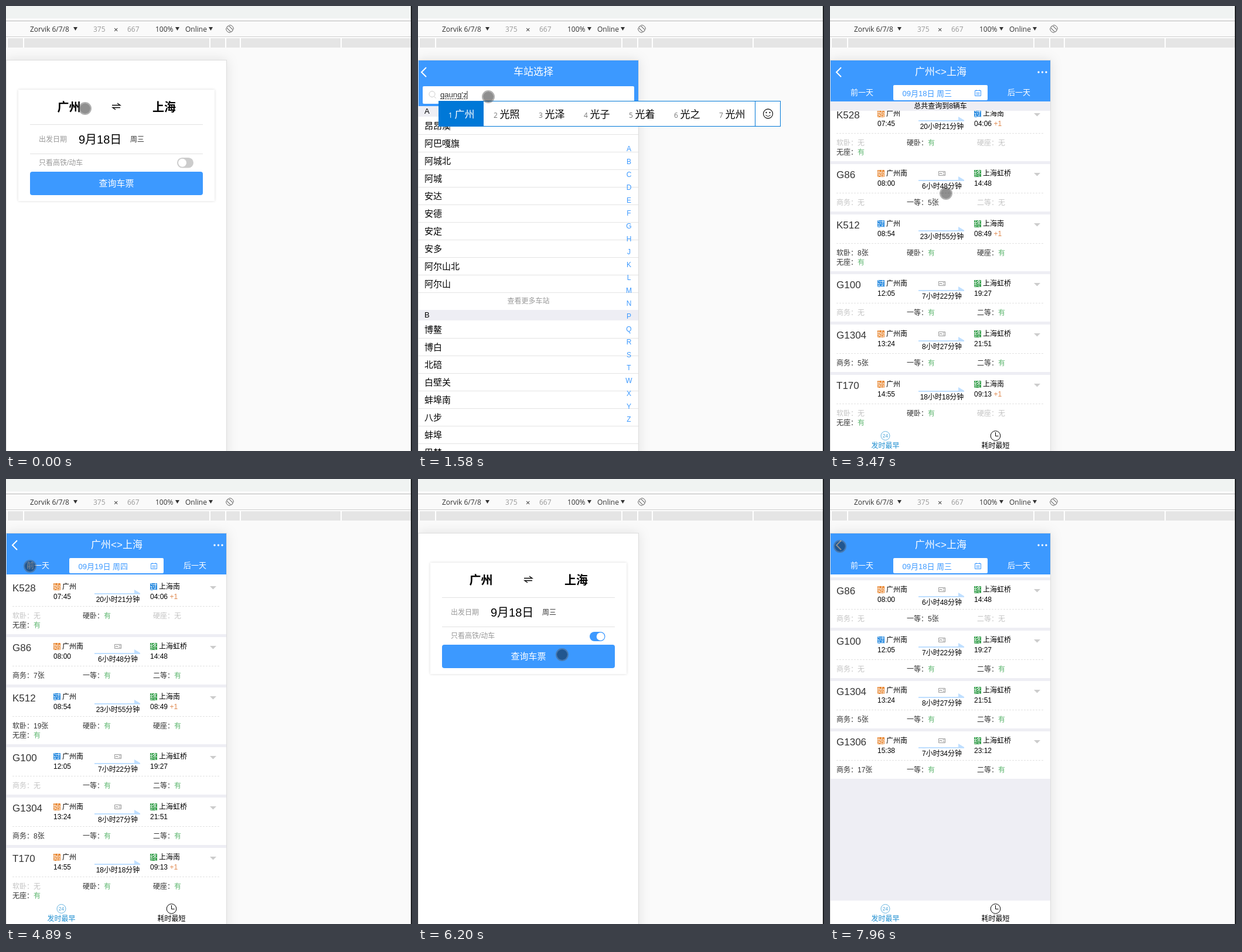
Animation, 693 px wide and 760 px high, one loop 8000 ms. Source, as an HTML page:

```html
<!DOCTYPE html>
<html lang="zh-CN">
<head>
<meta charset="utf-8">
<style>
html, body { margin: 0; width: 100%; height: 100%; overflow: hidden; background: #fafafa; }
svg { display: block; font-family: "Liberation Sans", "Noto Sans CJK SC", "Noto Sans CJK", sans-serif; }
.tool { font-family: "Open Sans", sans-serif; }
.phone { filter: drop-shadow(0 0 10px #0000001a); }
.card { filter: drop-shadow(0 0 2px #00000026); }
</style>
</head>
<body>
<svg id="stage" width="693" height="760"></svg>
<script>
const BLUE = '#3c99ff', PALE = '#eeeef4', LOOP = 8000, GLIDE = 340;

// drawing helpers
const rect = (x, y, w, h, fill, more = '') =>
  `<rect x="${x}" y="${y}" width="${w}" height="${h}" fill="${fill}" ${more}/>`;
const text = (s, x, y, size, fill = '#000', more = '') =>
  `<text x="${x}" y="${y}" font-size="${size}" fill="${fill}" ${more}>${s}</text>`;
const mid = (s, x, y, size, fill, more = '') => text(s, x, y, size, fill, 'text-anchor="middle" ' + more);
const path = (d, stroke, width = 1, more = '') =>
  `<path d="${d}" fill="none" stroke="${stroke}" stroke-width="${width}" ${more}/>`;
const solid = (d, fill) => `<path d="${d}" fill="${fill}"/>`;
const circle = (x, y, r, fill, more = '') => `<circle cx="${x}" cy="${y}" r="${r}" fill="${fill}" ${more}/>`;
const ring = (x, y, r, stroke, width = 1) => circle(x, y, r, 'none', `stroke="${stroke}" stroke-width="${width}"`);
const each = (list, fn) => [...list].map(fn).join('');
const clamp = p => Math.min(1, Math.max(0, p));
const ease = p => p * p * (3 - 2 * p);

const pen = document.createElement('canvas').getContext('2d');
function textWidth(s, size) {
  pen.font = `${size}px "Liberation Sans", "Noto Sans CJK SC", sans-serif`;
  return pen.measureText(s).width;
}

// where the pointer rests: arrival time, x, y
const stops = [
  [630, 120, 155], [2300, 278, 180], [2650, 204, 312], [3290, 198, 320], [4000, 319, 151], [4890, 41, 149],
  [5400, 17, 115], [5820, 306, 268], [6200, 246, 300], [7210, 300, 288], [7640, 26, 131], [7960, 17, 115]
];

function pointer(t) {
  let x = 135, y = 175;
  for (const [arrive, toX, toY] of stops) {
    const p = ease(clamp((t - arrive) / GLIDE + 1));
    x += (toX - x) * p;
    y += (toY - y) * p;
  }
  return circle(x, y, 9, '#000', 'fill-opacity=".44"') + ring(x, y, 10, '#55555577', 2);
}

const chrome =
  rect(0, 0, 693, 760, '#fafafa') + rect(0, 0, 693, 21, '#f0f3f2') + rect(0, 25, 693, 1, '#b9b9b9') +
  rect(0, 52, 693, 1, '#ccc') + rect(0, 53, 693, 2, '#fff') + rect(0, 55, 693, 16, '#e5e5e5') +
  each([1, 29, 347, 374, 399, 571], x => rect(x, 54, 2, 17, '#fff')) +
  '<g class="tool">' + text('Zorvik 6/7/8', 41, 44, 12, '#333') + text('375', 149, 44, 12, '#999') +
  text('×', 184, 45, 13, '#333') + text('667', 207, 44, 12, '#999') + text('100%', 255, 44, 12, '#333') +
  text('Online', 306, 44, 12, '#333') + '</g>' +
  each([115, 289, 346], x => solid(`M${x} 36h7l-3.5 6z`, '#333')) +
  '<g transform="translate(382 39)" fill="none" stroke="#666">' +
  '<rect x="-2.5" y="-5.5" width="5" height="11" rx="1" transform="rotate(-45)"/>' +
  '<path d="M-1 -6.3A6.5 6.5 0 0 1 6.3 1M1 6.3A6.5 6.5 0 0 1 -6.3 -1"/></g>' +
  rect(0, 92, 377, 680, '#ddd', 'class="phone"') + rect(1, 93, 375, 667, '#fff');

const back = x => path(`M${x + 8} 105l-8 8 8 8`, '#fff', 2);

// search form
function home(t) {
  const toggle = t > 6000
    ? rect(293, 261, 26.5, 16, BLUE, 'rx="8"') + circle(311.5, 269, 6.8, '#fff')
    : rect(292, 259, 28, 17.5, '#ccc', 'rx="8.7"') + circle(301, 267.8, 7, '#fff');
  return rect(21, 143, 335, 190, '#fff', 'class="card"') +
    text('广州', 87.5, 180, 20, '#000', 'font-weight="bold"') +
    text('上海', 250, 180, 20, '#000', 'font-weight="bold"') +
    path('M181 169.5H195L190 166M195 173.5H182L187 177', '#000', 1.3) +
    rect(41, 202, 295, 1, '#e2e2e2') + rect(41, 252, 295, 1, '#e2e2e2') +
    text('出发日期', 56, 232, 12, '#999') + text('9月18日', 124, 235, 20) + text('周三', 212, 232, 12, '#333') +
    text('只看高铁/动车', 56, 272, 12, '#999') + toggle +
    rect(41, 283, 295, 40, BLUE, 'rx="4"') + mid('查询车票', 188.5, 308, 15, '#fff');
}

// station picker
const groups = {
  A: '昂昂溪 阿巴嘎旗 阿城北 阿城 安达 安德 安定 安多 阿尔山北 阿尔山',
  B: '博鳌 博白 北碚 白壁关 蚌埠南 八步 蚌埠 巴楚'
};

const rows = (names, top) => each(names.split(' '), (name, i) =>
  text(name, 11, top + 20.5 + i * 30, 15) + rect(1, top + 30 + i * 30, 375, 1, '#e4e4e4'));
const group = (name, top) =>
  rect(1, top, 375, 18, PALE) + text(name, 11, top + 13, 13) + rows(groups[name], top + 18);

function candidates(words) {
  let x = 35, items = '';
  words.split(' ').forEach((word, i) => {
    const wide = 43 + 17 * word.length;
    if (!i) items += rect(x, 162, wide, 44, '#0078d7');
    items += text(i + 1, x + 17, 191, 12, i ? '#777' : '#fff', 'class="tool"') +
      text(word, x + 27.5, 191, 17, i ? '#000' : '#fff');
    x += wide;
  });
  const face = x + 23.5;
  return rect(35.5, 162.5, x + 9, 43, '#fff', 'stroke="#0078d7"') + items + path(`M${x + 1.5} 163v43`, '#0078d7') +
    ring(face, 184, 8, '#222', 1.3) + each([-3, 3], dx => circle(face + dx, 182, 1.2, '#222')) +
    path(`M${face - 4} 186q4 5 8 0`, '#222', 1.2);
}

function stations(t) {
  const chosen = t >= 1710, keys = "gaung'z".slice(0, Math.max(0, Math.ceil((t - 1200) / 50)));
  const typed = chosen ? '广州' : keys, composing = keys && !chosen;
  const width = textWidth(typed, 13.1);
  const list = chosen
    ? rows('广州 广州东 广州南 广州北 广州西', 171)
    : group('A', 171) + mid('查看更多车站', 188.5, 508, 12, '#999') + group('B', 519) +
      each('ABCDEFGHJKLMNPQRSTWXYZ', (c, i) => mid(c, 360, 248 + i * 22, 12, BLUE));
  return list + rect(1, 93, 375, 78, BLUE) + back(6) + mid('车站选择', 197, 118, 17, '#fff') +
    rect(8, 137, 361, 30, '#fff', 'rx="2"') + ring(24, 150.5, 5, '#ccc') + path('M27.5 154.5l3 3', '#ccc') +
    text(typed, 38, 156, 13.1, '#333') + (t > 770 ? rect(38 + width, 145, 1, 14, '#333') : '') +
    (composing ? path(`M38 158.5h${width}`, '#333', 1, 'stroke-dasharray="3 1"') +
      candidates(keys.length < 6 ? '广 光 逛 广州 光照 管 广告' : '广州 光照 光泽 光子 光着 光之 光州') : '');
}

// number, from, departs, to, arrives, duration, seats left (and on the next day)
const trains = [
  'K528|始广州|07:45|过上海南|04:06+|20小时21分钟|无 有 无 有',
  'G86|始广州南|08:00|终上海虹桥|14:48|6小时48分钟|无 5张 无|7张 有 有',
  'K512|过广州|08:54|终上海南|08:49+|23小时55分钟|8张 有 有 有|19张 有 有 有',
  'G100|过广州南|12:05|终上海虹桥|19:27|7小时22分钟|无 有 有',
  'G1304|始广州南|13:24|终上海虹桥|21:51|8小时27分钟|5张 有 有|8张 有 有',
  'T170|始广州|14:55|终上海南|09:13+|18小时18分钟|无 有 无 有|无 有 有 有',
  'G1306|始广州南|15:38|终上海虹桥|23:12|7小时34分钟|17张 有 有'
].map(s => s.split('|'));
const isFast = train => train[0][0] == 'G';
const badgeColor = { 始: '#e8852e', 过: '#2b8ce0', 终: '#2f9c46' };
const seatColor = { 无: '#c4c4c4', 有: '#62b873' };

const stop = (name, time, x, y) => rect(x, y + 10, 12, 12, badgeColor[name[0]], 'rx="1"') +
  mid(name[0], x + 6, y + 20.5, 12, '#fff') + text(name.slice(1), x + 15, y + 20, 12) +
  text(time.slice(0, 5), x, y + 37, 12) + (time[5] ? text('+1', x + 33.5, y + 37, 12, '#e08a50') : '');
const seat = (label, left, x, y) => text(label + '：', x, y, 12, left == '无' ? seatColor.无 : '#333') +
  text(left, x + 36, y, 12, seatColor[left] || '#333');

function card(train, y, nextDay) {
  const [id, from, departs, to, arrives, span, today, tomorrow] = train, fast = isFast(train);
  const seats = (nextDay && tomorrow || today).split(' ');
  const labels = fast ? ['商务', '一等', '二等'] : ['软卧', '硬卧', '硬座', '无座'];
  return rect(1, y, 375, fast ? 81 : 97, '#fff') + text(id, 11, y + 24, 17, '#333') +
    stop(from, departs, 81, y) + stop(to, arrives, 246, y) +
    rect(151, y + 27, 78, 2, '#bfdfff') + solid(`M219 ${y + 21}l10 6v2h-10z`, '#bfdfff') +
    mid(span, 191, y + 42, 12, '#000') +
    (fast ? path(`M185.5 ${y + 12.5}h11v7h-11zm2 5v-2h3v2m2-3h3m-3 3h3`, '#999') : '') +
    solid(`M348 ${y + 15}h11l-5.5 5.5z`, '#ccc') +
    path(`M11 ${y + 49.5}H366`, '#e2e2e2', 1, 'stroke-dasharray="3 2"') +
    each(seats, (s, i) => seat(labels[i], s, 11 + i % 3 * 120, y + 70 + (i > 2 ? 16 : 0)));
}

function results(t) {
  const filtered = t > 6600, nextDate = t > 3970 && t < 5100, nextSeats = t > 4600 && t < 5200;
  let y = filtered ? 173 : 168;
  const cards = each(trains.filter(train => !filtered || isFast(train)), train => {
    const drawn = card(train, y, nextSeats);
    y += isFast(train) ? 86 : 102;
    return drawn;
  });
  // the summary strip slides away under the header
  const lift = 16 * clamp((t - (t < 6000 ? 3680 : 6900)) / 200);
  return rect(1, 163, 375, 597, PALE) + rect(1, 163, 375, 5, '#fff') + cards +
    rect(1, 163 - lift, 375, 16, PALE) +
    mid(`总共查询到${filtered ? 4 : 8}辆车`, 188.5, 175 - lift, 12, '#000') +
    rect(1, 93, 375, 70, BLUE) + back(11) + mid('广州&lt;&gt;上海', 189, 118, 17, '#fff') +
    each([0, 1, 2], i => circle(356 + 6.5 * i, 113, 1.7, '#fff')) +
    text('前一天', 35, 152, 13, '#fff') + text('后一天', 303, 152, 13, '#fff') +
    rect(108, 135, 161, 26, '#fff', 'rx="2"') +
    text(nextDate ? '09月19日 周四' : '09月18日 周三', 123.5, 154, 13, BLUE) +
    path('M247.5 144.5h10v9h-10zm2-1.5v2m6-2v2m-6 3.5h6m-6 2.5h6', BLUE) +
    rect(1, 720, 375, 40, '#fff') +
    ring(94.5, 734, 7.5, '#65b3e0') + mid('24', 94.5, 737, 8.5, '#4ba3d8') +
    mid('发时最早', 94.5, 755, 12, '#1f8fd0') +
    ring(282.5, 734, 8.3, '#000') + path('M282.5 728v6.5h5', '#000') + mid('耗时最短', 282.5, 755, 12, '#000');
}

// pages and when each one opens
const pages = [[0, home], [215, stations], [2230, home], [3290, results], [5520, home], [6330, results]];

const stage = document.getElementById('stage');
let shown;
function draw() {
  const t = performance.now() % LOOP;
  const [, page] = pages.findLast(([start]) => start <= t);
  const picture = chrome + page(t) + pointer(t) + rect(691, 0, 2, 760, '#1d2023');
  if (picture !== shown) stage.innerHTML = shown = picture;
  requestAnimationFrame(draw);
}
draw();
</script>
</body>
</html>
```
